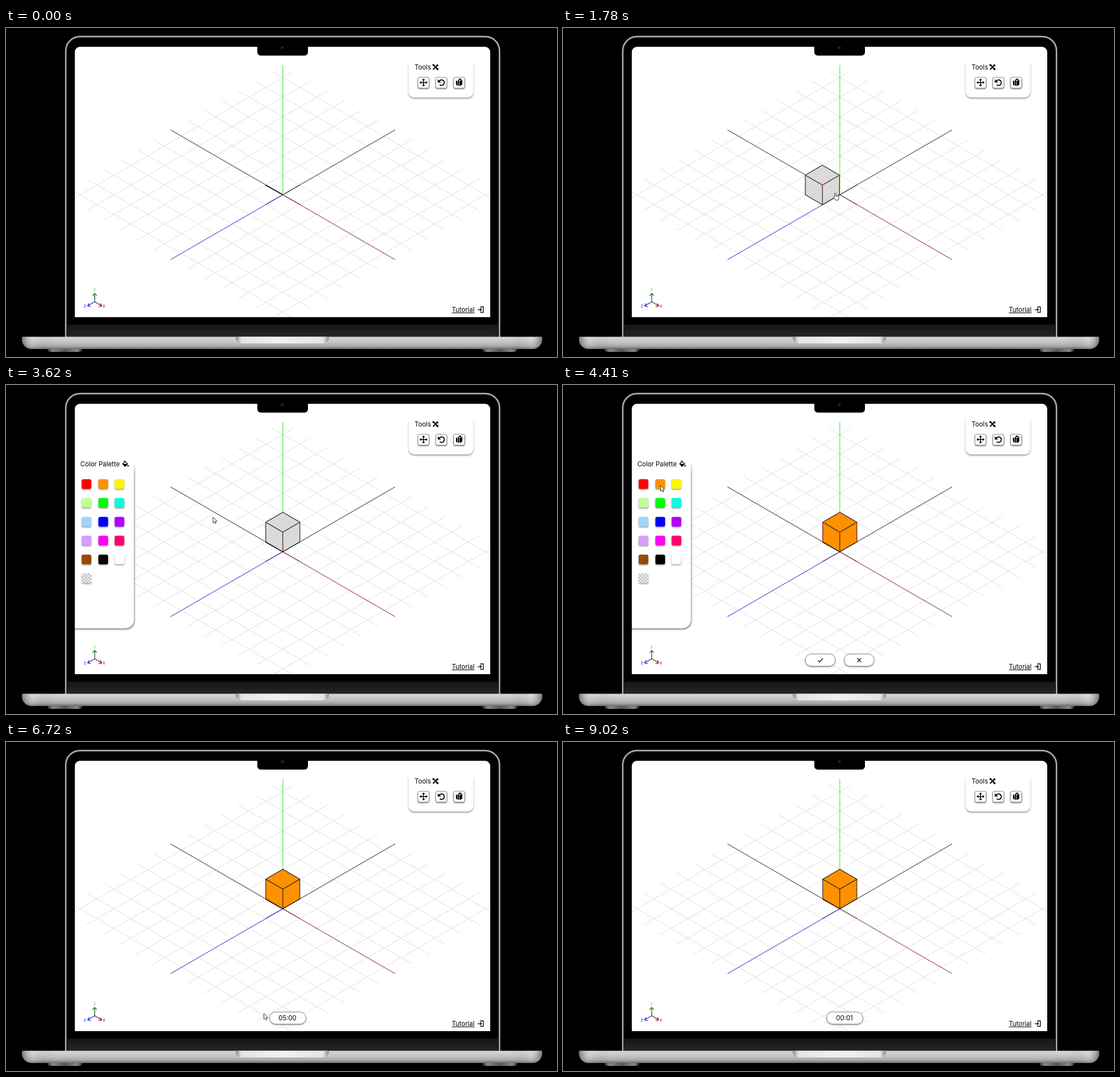
Write an HTML page with a canvas that moves like this. It is 969x578 px and loops after 9.79 s.

```html
<!DOCTYPE html>
<html lang="en">
<head>
<meta charset="utf-8">
<title>Cube editor demo</title>
<style>
html, body { margin: 0; width: 100%; height: 100%; overflow: hidden; background: #000; }
canvas { display: block; width: 969px; height: 578px; }
</style>
</head>
<body>
<canvas id="stage" width="969" height="578"></canvas>
<script>
const ctx = document.getElementById('stage').getContext('2d');
const LOOP = 9790;
const CX = 486.8, CY = 293, SLOPE = 0.5774, HALF = 197.5, CELL = 29.7;
const FONT = '11.4px Inter, sans-serif';
const SWATCHES = ['#ff0000', '#ff9100', '#fff500', '#c1ff98', '#00ff00', '#00ffdc',
  '#9dd7ff', '#0000ff', '#b000ff', '#d69eff', '#ff00f5', '#ff006f',
  '#964b00', '#000000', '#ffffff'];

// Cursor waypoints: time, x, y
const PATH = [
  [680, 947, 574], [1350, 430, 257], [1600, 496, 306], [1750, 490, 300], [1780, 479, 290],
  [1930, 470, 287], [2210, 470, 287], [2610, 493.5, 269.5], [3280, 493.5, 269.5],
  [4060, 171.5, 176.5], [4790, 171.5, 176.5], [5510, 455, 463], [5730, 453.5, 477],
  [6720, 453.5, 477], [7420, 641, 497.5], [7800, 641, 497.5], [8530, 942, 579]
];
// Clicks: start, end, x, y
const CLICKS = [[2830, 2980, 493, 270], [4280, 4410, 172, 177], [5980, 6100, 454, 478]];

function cursorAt(t) {
  for (let i = 1; i < PATH.length; i++) {
    const [t0, x0, y0] = PATH[i - 1], [t1, x1, y1] = PATH[i];
    if (t <= t1) {
      const k = Math.max(0, (t - t0) / (t1 - t0));
      const e = (1 - Math.cos(Math.PI * k)) / 2;
      return [x0 + (x1 - x0) * e, y0 + (y1 - y0) * e];
    }
  }
  return PATH[PATH.length - 1].slice(1);
}

function poly(points, fill, stroke, width = 1, close = true) {
  ctx.beginPath();
  points.forEach(([x, y]) => ctx.lineTo(x, y));
  if (close) ctx.closePath();
  if (fill) { ctx.fillStyle = fill; ctx.fill(); }
  if (stroke) { ctx.strokeStyle = stroke; ctx.lineWidth = width; ctx.stroke(); }
}

function line(x0, y0, x1, y1, color, width = 1) {
  poly([[x0, y0], [x1, y1]], null, color, width, false);
}

function box(x, y, w, h, r, fill, stroke, width = 1) {
  ctx.beginPath();
  ctx.roundRect(x, y, w, h, r);
  if (fill) { ctx.fillStyle = fill; ctx.fill(); }
  if (stroke) { ctx.strokeStyle = stroke; ctx.lineWidth = width; ctx.stroke(); }
}

function shadowed(dx, dy, blur, color, draw) {
  ctx.save();
  ctx.shadowColor = color;
  ctx.shadowBlur = blur;
  ctx.shadowOffsetX = dx;
  ctx.shadowOffsetY = dy;
  draw();
  ctx.restore();
}

function text(str, x, y, color = '#000', font = FONT) {
  ctx.font = font;
  ctx.fillStyle = color;
  ctx.fillText(str, x, y);
}

function ramp(x0, y0, x1, y1, stops) {
  const g = ctx.createLinearGradient(x0, y0, x1, y1);
  stops.forEach(([at, color]) => g.addColorStop(at, color));
  return g;
}

function laptop() {
  ctx.fillStyle = '#000';
  ctx.fillRect(0, 0, 969, 578);
  box(105, 15, 763, 560, 25, '#000', '#b4b4b6', 2.4);
  box(107, 17, 759, 556, 23, null, '#3a3a3c', 1);
  ctx.fillStyle = '#000';
  ctx.fillRect(100, 543, 775, 35);
  ctx.fillStyle = ramp(0, 521, 0, 543, [[0, '#151515'], [1, '#262626']]);
  ctx.fillRect(108, 521, 757, 22);
  for (const x of [73, 838]) {
    box(x, 561, 61, 8, [0, 0, 5, 5], ramp(x, 0, x + 61, 0,
      [[0, '#333'], [0.15, '#8a8a8a'], [0.5, '#555'], [0.85, '#8a8a8a'], [1, '#333']]));
  }
  box(28, 542.5, 915, 21.5, [2, 2, 17, 17], ramp(0, 543, 0, 564,
    [[0, '#d6d6d8'], [0.45, '#c2c2c4'], [0.75, '#a9a9ab'], [1, '#6e6e70']]));
  box(28, 542.5, 915, 21.5, [2, 2, 17, 17], ramp(28, 0, 943, 0,
    [[0, 'rgba(0,0,0,.42)'], [0.022, 'rgba(255,255,255,.12)'], [0.06, 'rgba(0,0,0,0)'],
     [0.94, 'rgba(0,0,0,0)'], [0.978, 'rgba(255,255,255,.12)'], [1, 'rgba(0,0,0,.42)']]));
  box(404, 542.5, 164, 11.5, [0, 0, 10, 10], ramp(404, 0, 568, 0,
    [[0, '#858587'], [0.06, '#e4e4e6'], [0.5, '#f1f1f3'], [0.94, '#e4e4e6'], [1, '#858587']]));
  box(121, 33, 730.5, 475, [9, 9, 0, 0], '#fff');
}

function notch() {
  box(442, 30, 89, 18.5, [0, 0, 6, 6], '#000');
  ctx.beginPath();
  ctx.arc(486, 34.5, 3, 0, 7);
  ctx.fillStyle = '#17181b';
  ctx.fill();
  ctx.beginPath();
  ctx.arc(486, 34.5, 1.2, 0, 7);
  ctx.fillStyle = '#2c3038';
  ctx.fill();
}

function grid() {
  const rise = HALF * SLOPE;
  for (let k = -6; k <= 6; k++) {
    const dx = k * CELL, dy = dx * SLOPE;
    if (!k) continue;
    line(CX - HALF + dx, CY - rise - dy, CX + HALF + dx, CY + rise - dy, '#dedede');
    line(CX - HALF + dx, CY + rise + dy, CX + HALF + dx, CY - rise + dy, '#dedede');
  }
  line(CX, CY, CX - HALF, CY - rise, '#222');
  line(CX, CY, CX + HALF, CY - rise, '#222');
  line(CX, CY, CX - HALF, CY + rise, '#2d22d0');
  line(CX, CY, CX + HALF, CY + rise, '#8a2222');
  line(CX, CY, CX - 30, CY - 17, '#000', 1.5);
  line(CX, CY, CX + 30, CY - 17, '#222');
  line(CX, CY, CX - 30, CY + 17, '#1c1780');
  line(CX, CY, CX + 30, CY + 17, '#6d1818');
  line(486.8, 65, 486.8, CY, '#4de84d', 1.2);
}

// (x, y) is the nearest bottom corner
function cube(x, y, fill, preview) {
  const w = 30, s = 17.4, h = 34.6;
  const base = [x, y], left = [x - w, y - s], right = [x + w, y - s];
  const mid = [x, y - h], upLeft = [x - w, y - s - h], upRight = [x + w, y - s - h];
  const top = [x, y - 2 * s - h];
  ctx.lineJoin = 'round';
  poly([base, left, upLeft, top, upRight, right], fill, '#1a1a1a', 1.1);
  poly([upLeft, mid, upRight], null, '#1a1a1a', 1.1, false);
  line(...mid, ...base, '#1a1a1a', 1.1);
  if (!preview) return;
  const tint = (a, b, from, to) => {
    const at = k => [a[0] + (b[0] - a[0]) * k, a[1] + (b[1] - a[1]) * k];
    line(...at(from), ...at(to), '#e02020', 1);
  };
  tint(upLeft, left, 0, 0.2);
  tint(upLeft, left, 0.5, 1);
  tint(upRight, right, 0, 0.15);
  tint(upRight, right, 0.6, 1);
  tint(mid, base, 0, 0.12);
  tint(mid, base, 0.82, 1);
  for (const [a, b] of [[top, upLeft], [top, upRight], [upLeft, mid], [upRight, mid]]) {
    tint(a, b, 0, 0.14);
    tint(a, b, 0.88, 1);
  }
}

function gizmo() {
  line(156, 481, 156, 466.5, '#165c16', 1.3);
  poly([[152.3, 470.3], [156, 466.3], [159.7, 470.3]], null, '#1d7a1d', 1.3, false);
  line(156, 481, 144, 488, '#2a20d8', 1.3);
  poly([[146.3, 483.6], [143.6, 488.3], [149, 489.6]], null, '#2a20d8', 1.3, false);
  line(156, 481, 168, 488, '#7c1a1a', 1.3);
  poly([[165.7, 483.6], [168.4, 488.3], [163, 489.6]], null, '#7c1a1a', 1.3, false);
  const small = '7.5px Inter, sans-serif';
  text('y', 153.8, 462, '#5fd35f', small);
  text('z', 136.8, 491.3, '#2a20d8', small);
  text('x', 170.2, 491.3, '#8a2222', small);
}

function toolIcons() {
  // crossed tools
  line(752, 65, 759.3, 72.6, '#000', 2);
  line(751, 73, 758, 66, '#000', 2);
  line(750.5, 64, 752.8, 66.2, '#000', 3);
  line(757.2, 70.6, 760, 73.3, '#000', 3);
  poly([[756.3, 66], [758.6, 63.3], [760.6, 65.6], [759.4, 67.8]], '#000');

  for (const x of [724.5, 755.8, 787.2]) {
    shadowed(0, 1.5, 2, 'rgba(0,0,0,.4)', () => box(x, 86.5, 19.5, 19, 3, '#fff', '#8a8a8a', 0.9));
    box(x, 86.5, 19.5, 19, 3, '#fff', '#8a8a8a', 0.9);
  }
  // move
  for (let i = 0; i < 4; i++) {
    ctx.save();
    ctx.translate(734.3, 95.8);
    ctx.rotate(i * Math.PI / 2);
    line(0, 0, 0, -5, '#000', 1.4);
    poly([[-2.8, -4], [0, -7], [2.8, -4]], '#000');
    ctx.restore();
  }
  // undo
  ctx.beginPath();
  ctx.arc(766, 96, 4.8, -2.6, 2.3);
  ctx.strokeStyle = '#000';
  ctx.lineWidth = 1.8;
  ctx.stroke();
  poly([[759.3, 90], [759.3, 95.8], [765, 95.8]], '#000');
  // layers
  poly([[791.4, 92], [794, 93.6], [794, 101.4], [791.4, 99.6]], '#000');
  poly([[794.8, 90.5], [797.2, 92], [797.2, 102], [794.8, 100.8]], '#000');
  poly([[798, 93], [802.4, 90.8], [802.4, 99.4], [798, 102]], '#000');
  poly([[795.5, 90], [798.5, 88.8], [801.8, 90], [798, 91.8]], '#000');
}

function tools() {
  shadowed(0, 2, 3, 'rgba(0,0,0,.38)', () => box(708, 54, 114, 68, [4, 4, 10, 10], '#fff'));
  ctx.fillStyle = ramp(0, 48, 0, 72, [[0, '#fff'], [0.3, '#fff'], [1, 'rgba(255,255,255,0)']]);
  ctx.fillRect(703, 46, 124, 26);
  text('Tools', 718.5, 73);
  toolIcons();
}

function tutorial() {
  text('Tutorial', 784, 498.7);
  line(784, 500.5, 824, 500.5, '#000');
  poly([[834, 490], [839.5, 490], [839.5, 499.5], [834, 499.5]], null, '#000', 1.3, false);
  line(829.5, 494.8, 836, 494.8, '#000', 1.3);
  poly([[833.5, 492], [836.3, 494.8], [833.5, 497.6]], null, '#000', 1.3, false);
}

function palette() {
  ctx.save();
  ctx.beginPath();
  ctx.rect(121, 128, 112, 308);
  ctx.clip();
  shadowed(1, 2, 3, 'rgba(0,0,0,.5)', () => box(108, 134, 117, 293.5, [0, 4, 15, 0], '#fff'));
  ctx.fillStyle = ramp(0, 128, 0, 155, [[0, '#fff'], [0.25, '#fff'], [1, 'rgba(255,255,255,0)']]);
  ctx.fillRect(121, 128, 110, 27);
  ctx.restore();

  text('Color Palette', 130.8, 142.5);
  // paint bucket
  poly([[205.3, 138.5], [209.6, 134.2], [214, 138.6], [209.4, 143]], '#fff', '#000', 1.2);
  poly([[205.3, 138.5], [214, 138.6], [209.4, 143]], '#000');
  line(207.3, 132.8, 210, 135.5, '#000', 1.2);
  ctx.beginPath();
  ctx.arc(214.7, 142, 1.3, 0, 7);
  ctx.fillStyle = '#000';
  ctx.fill();

  const xs = [133, 162.5, 191], rowY = i => 165.5 + 33.1 * i;
  SWATCHES.forEach((color, i) => {
    shadowed(0, 1.5, 2.5, 'rgba(0,0,0,.42)', () =>
      box(xs[i % 3], rowY(Math.floor(i / 3)), 17, 17, 3, color));
  });
  const y = rowY(5);
  shadowed(0, 1.5, 2.5, 'rgba(0,0,0,.42)', () => box(133, y, 17, 17, 3, '#f2f4f5'));
  ctx.save();
  ctx.beginPath();
  ctx.roundRect(133, y, 17, 17, 3);
  ctx.clip();
  ctx.fillStyle = '#b9c0c4';
  const q = 17 / 6;
  for (let i = 0; i < 36; i++) {
    const c = i % 6, r = Math.floor(i / 6);
    if ((c + r) % 2 === 0) ctx.fillRect(133 + c * q, y + r * q, q, q);
  }
  ctx.restore();
}

function pill(x, y, w, h) {
  shadowed(0, 1.5, 2.5, 'rgba(0,0,0,.4)', () => box(x, y, w, h, h / 2, '#fff'));
  box(x, y, w, h, h / 2, '#fff', '#777', 0.9);
}

function confirmButtons() {
  pill(426, 472.5, 53, 21.5);
  pill(494.3, 472.5, 53, 21.5);
  poly([[448.3, 483.7], [451.2, 486.6], [457, 480.3]], null, '#000', 1.3, false);
  line(517.5, 480, 524.3, 486.8, '#000', 1.2);
  line(524.3, 480, 517.5, 486.8, '#000', 1.2);
}

function timer(t) {
  pill(463.5, 474.3, 64, 21.3);
  ctx.textAlign = 'center';
  text(t < 7100 ? '05:00' : t < 9020 ? '04:59' : '00:01', 495, 489);
  ctx.textAlign = 'left';
}

function arrow(x, y) {
  poly([[x, y], [x, y + 10], [x + 2.3, y + 8], [x + 3.9, y + 11.4], [x + 5.5, y + 10.7],
    [x + 4, y + 7.4], [x + 7, y + 7.1]], '#fff', '#222', 0.9);
}

function hand(x, y) {
  ctx.save();
  ctx.translate(x, y);
  ctx.beginPath();
  ctx.moveTo(-1.3, 7);
  ctx.lineTo(-1.3, 1.2);
  ctx.quadraticCurveTo(-1.2, 0, -0.1, 0);
  ctx.quadraticCurveTo(1, 0, 1, 1.2);
  ctx.lineTo(1.1, 4.2);
  ctx.quadraticCurveTo(2.4, 3.6, 3, 4.7);
  ctx.quadraticCurveTo(4.2, 4.2, 4.8, 5.3);
  ctx.quadraticCurveTo(6.4, 5.1, 6.3, 6.8);
  ctx.quadraticCurveTo(6.3, 9.5, 5, 12.3);
  ctx.lineTo(-0.2, 12.3);
  ctx.quadraticCurveTo(-2, 9.6, -3.5, 7.6);
  ctx.quadraticCurveTo(-3.2, 5.8, -1.3, 7);
  ctx.closePath();
  ctx.fillStyle = '#fff';
  ctx.fill();
  ctx.strokeStyle = '#222';
  ctx.lineWidth = 0.9;
  ctx.stroke();
  line(1.1, 4.2, 1.1, 6.5, '#222', 0.7);
  line(3, 4.7, 3, 6.5, '#222', 0.7);
  ctx.restore();
}

function pointer(t) {
  for (const [from, to, x, y] of CLICKS) {
    if (t < from || t >= to) continue;
    ctx.beginPath();
    ctx.arc(x, y, 7, 0, 7);
    ctx.fillStyle = 'rgba(240,230,20,.75)';
    ctx.fill();
  }
  if (t < 680 || t >= 8530) return;
  const [x, y] = cursorAt(t);
  const grabbing = t >= 1750 && t < 4060 && x > 456;
  (grabbing ? hand : arrow)(x, y);
}

function placedCube(t) {
  if (t < 1750) return;
  const fill = t < 4410 ? '#dadada' : '#ff9100';
  const preview = t < 6100;
  if (t < 1780) cube(CX, CY + 35.4, fill, preview);
  else if (t < 2400) cube(CX - 30.6, CY + 17.5, fill, preview);
  else cube(CX, CY, fill, preview);
}

function render(t) {
  laptop();
  ctx.save();
  ctx.beginPath();
  ctx.rect(121, 33, 730.5, 475);
  ctx.clip();
  grid();
  placedCube(t);
  gizmo();
  tools();
  tutorial();
  if (t >= 2980 && t < 6100) palette();
  if (t >= 4410 && t < 6100) confirmButtons();
  if (t >= 6100) timer(t);
  ctx.restore();
  notch();
  pointer(t);
}

const start = performance.now();
function tick() {
  render((performance.now() - start) % LOOP);
  requestAnimationFrame(tick);
}
tick();
</script>
</body>
</html>
```
